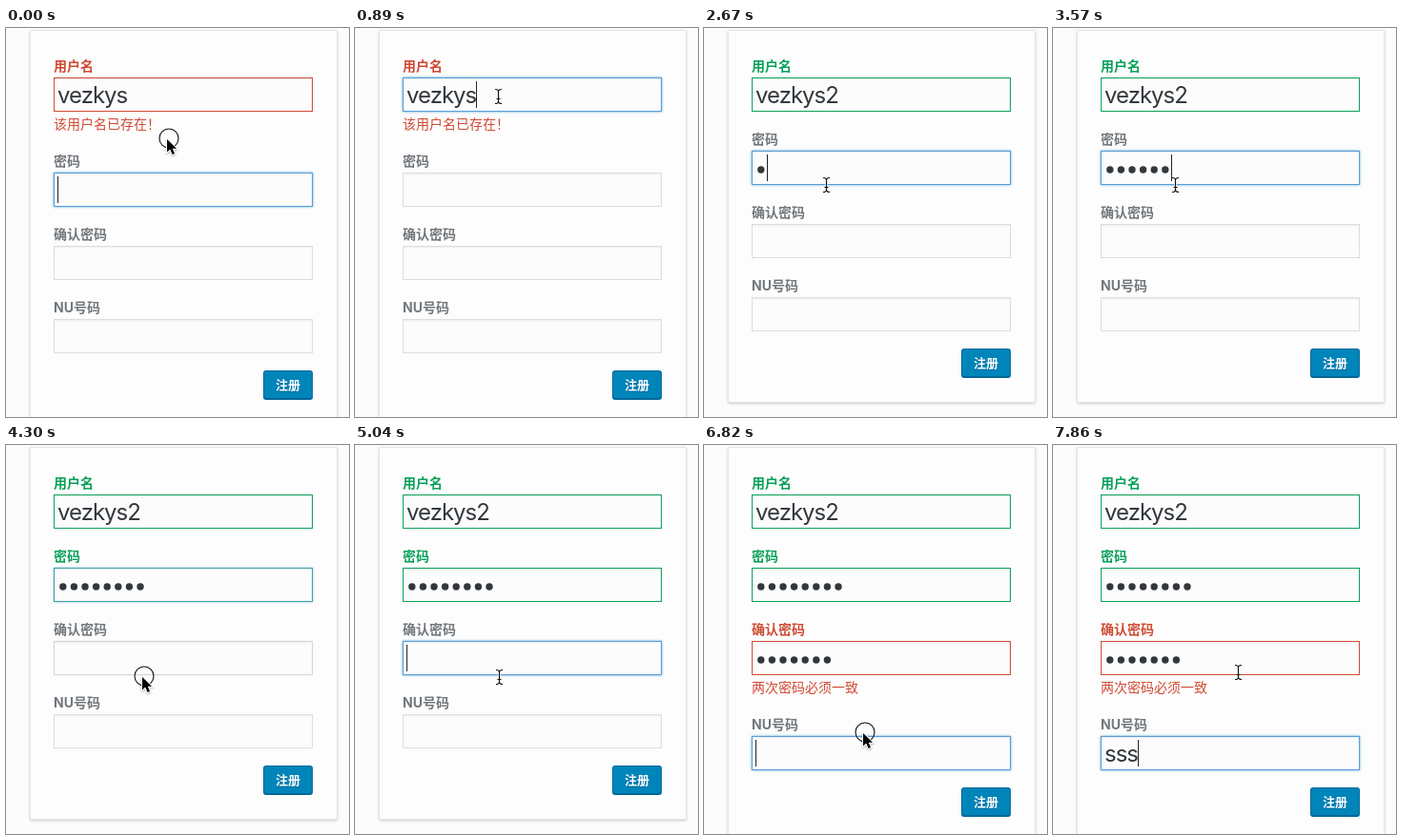
These frames come from a looping animation (360x409 px, 8 s). An HTML page with a canvas:

```html
<!DOCTYPE html>
<html lang="zh-CN">
<head>
<meta charset="utf-8">
<title>注册</title>
<style>
html, body { margin: 0; width: 100%; height: 100%; overflow: hidden; background: #fcfcfc; }
canvas { display: block; width: 360px; height: 409px; }
</style>
</head>
<body>
<canvas id="stage"></canvas>
<script>
const W = 360, H = 409, LOOP = 8000, STEP = 148.3;
const CJK = '"Noto Sans CJK SC", "Noto Sans CJK", sans-serif';
const RED = '#cf4b34', GREEN = '#0aa15b', BLUE = '#5b9dd9';
const GRAY = '#72777c', LINE = '#dddddd', INK = '#32373c';
const LEFT = 50, WIDTH = 272, HEIGHT = 36, GAP = 23, PITCH = 11.6;

const canvas = document.getElementById('stage');
const ctx = canvas.getContext('2d');
const dpr = window.devicePixelRatio || 1;
canvas.width = W * dpr;
canvas.height = H * dpr;

// Pointer stops: step, x, y
const path = [
  [0, 169, 117], [1, 166, 110], [4, 150, 72], [10, 150, 72], [12, 135, 148],
  [13, 128, 165], [27, 128, 165], [29, 143, 244], [32, 143, 244], [35, 168, 243],
  [42, 168, 243], [44, 167, 303], [47, 167, 303], [50, 194, 239], [54, 194, 239]
];
const clicks = [[0, 0], [4, 5], [13, 14], [29, 31], [44, 46]];

const clamp = (v, lo, hi) => Math.max(lo, Math.min(hi, v));
const within = (n, a, b) => n >= a && n <= b;

function pointerAt(n) {
  const i = path.findIndex(p => p[0] > n);
  const [n0, x0, y0] = path[i - 1], [n1, x1, y1] = path[i];
  const k = (n - n0) / (n1 - n0);
  return [x0 + (x1 - x0) * k, y0 + (y1 - y0) * k];
}

function mix(a, b, k) {
  const part = (c, i) => parseInt(c.slice(i, i + 2), 16);
  return 'rgb(' + [1, 3, 5].map(i => Math.round(part(a, i) + (part(b, i) - part(a, i)) * k)) + ')';
}

function shadow(color, blur, dy = 0) {
  ctx.shadowColor = color;
  ctx.shadowBlur = blur * dpr;
  ctx.shadowOffsetY = dy * dpr;
}

function text(str, x, y, font, color, spacing = 0) {
  ctx.font = font;
  ctx.letterSpacing = spacing + 'px';
  ctx.fillStyle = color;
  ctx.fillText(str, x, y);
  return ctx.measureText(str).width;
}

function box(x, y, w, h, r) {
  ctx.beginPath();
  ctx.roundRect(x, y, w, h, r);
}

function drawCard(bottom) {
  ctx.save();
  shadow('rgba(0,0,0,.2)', 3, 1);
  ctx.fillStyle = '#e6e6e6';
  box(25, 2, 323, bottom - 2, 2);
  ctx.fill();
  ctx.restore();
  ctx.fillStyle = '#fdfdfd';
  ctx.fillRect(26, 3, 321, bottom - 4);
}

function drawField(f, y) {
  const focus = f.focus || 0, tone = f.tone || LINE;
  text(f.label, LEFT, y - 7, `bold 14px Inter, ${CJK}`, f.tone || GRAY);

  ctx.save();
  if (focus) shadow(`rgba(30,140,190,${0.8 * focus})`, 2.5);
  ctx.fillStyle = mix(tone, BLUE, focus);
  ctx.fillRect(LEFT, y, WIDTH, HEIGHT);
  ctx.restore();
  ctx.fillStyle = '#fcfcfc';
  ctx.fillRect(LEFT + 1, y + 1, WIDTH - 2, HEIGHT - 2);
  ctx.fillStyle = 'rgba(0,0,0,.045)';
  ctx.fillRect(LEFT + 1, y + 1, WIDTH - 2, 1);
  ctx.fillStyle = 'rgba(0,0,0,.02)';
  ctx.fillRect(LEFT + 1, y + 2, WIDTH - 2, 1);

  let end = 54;
  if (f.value) end += text(f.value, 54, y + 27, '24px Inter, sans-serif', INK, -1);
  if (f.dots) {
    ctx.fillStyle = INK;
    for (let i = 0; i < f.dots; i++) {
      ctx.beginPath();
      ctx.arc(59.8 + i * PITCH, y + 20, 3.7, 0, 7);
      ctx.fill();
    }
    end += f.dots * PITCH;
  }
  if (f.caret) {
    ctx.fillStyle = '#222';
    ctx.fillRect(Math.round(end), y + 4, 1, 28);
  }
  if (f.error) text(f.error, LEFT, y + 54, `14px ${CJK}`, RED);
}

function drawButton(y) {
  ctx.fillStyle = '#006799';
  box(270, y, 52, 31, 3);
  ctx.fill();
  ctx.fillStyle = '#0085ba';
  box(271, y + 1, 50, 28, 2);
  ctx.fill();
  ctx.save();
  shadow('#006799', 1, 1);
  text('注册', 283, y + 20, `bold 13px ${CJK}`, '#fff');
  ctx.restore();
}

function drawArrow(x, y) {
  ctx.save();
  ctx.translate(x, y);
  ctx.beginPath();
  [[0, 0], [0, 13.5], [3.2, 10.6], [5.6, 16], [8, 15], [5.7, 9.7], [10, 9.7]]
    .forEach(p => ctx.lineTo(...p));
  ctx.closePath();
  shadow('rgba(0,0,0,.3)', 2, 1);
  ctx.strokeStyle = '#fff';
  ctx.lineWidth = 2;
  ctx.stroke();
  shadow('transparent', 0);
  ctx.fillStyle = '#000';
  ctx.fill();
  ctx.restore();
}

function drawBeam(x, y) {
  ctx.save();
  ctx.translate(Math.round(x) + 0.5, Math.round(y));
  ctx.beginPath();
  for (const s of [-1, 1]) {
    ctx.moveTo(-3.5, s * 7.5);
    ctx.quadraticCurveTo(0, s * 7.5, 0, s * 5);
    ctx.quadraticCurveTo(0, s * 7.5, 3.5, s * 7.5);
  }
  ctx.moveTo(0, -6);
  ctx.lineTo(0, 6);
  ctx.moveTo(-2, 2.5);
  ctx.lineTo(2, 2.5);
  ctx.strokeStyle = 'rgba(255,255,255,.8)';
  ctx.lineWidth = 3;
  ctx.stroke();
  ctx.strokeStyle = '#111';
  ctx.lineWidth = 1.2;
  ctx.stroke();
  ctx.restore();
}

function drawPointer(n) {
  const [x, y] = pointerAt(n);
  const pressed = clicks.some(c => within(n, ...c));
  if (pressed) {
    ctx.beginPath();
    ctx.arc(x + 2, y - 1, 10, 0, 7);
    ctx.strokeStyle = '#111';
    ctx.lineWidth = 1.1;
    ctx.stroke();
  }
  if (pressed || n < 3 || n === 47) drawArrow(x, y);
  else drawBeam(x, y);
}

function fieldsAt(n) {
  const taken = n < 14, differs = n >= 45;
  const user = {
    label: '用户名', tone: taken ? RED : GREEN,
    value: n < 10 ? 'vezkys' : 'vezkys2',
    error: taken && '该用户名已存在！'
  };
  const pass = {
    label: '密码', tone: n >= 29 && GREEN,
    dots: n < 18 ? 0 : n < 27 ? clamp(n - 18, 1, 7) : 8
  };
  const again = {
    label: '确认密码', tone: differs && RED,
    dots: clamp(n - 35, 0, 7),
    error: differs && '两次密码必须一致'
  };
  const number = { label: 'NU号码', value: 's'.repeat(clamp(n - 50, 0, 3)) };

  const active = n < 4 ? pass : n < 13 ? user : n < 29 ? pass : n < 45 ? again : number;
  active.focus = n === 29 ? 0.1 : within(n, 30, 31) ? 0.7 : 1;
  active.caret = n !== 17 && n !== 29;
  if (n === 29) pass.focus = 0.6;
  return [user, pass, again, number];
}

function draw(n) {
  ctx.setTransform(dpr, 0, 0, dpr, 0, 0);
  ctx.fillStyle = '#fcfcfc';
  ctx.fillRect(0, 0, W, H);

  const fields = fieldsAt(n);
  drawCard(394 + (fields.some(f => f.error) ? GAP : 0));
  let y = 52;
  for (const f of fields) {
    drawField(f, y);
    y += 77 + (f.error ? GAP : 0);
  }
  drawButton(y - 23);
  drawPointer(n);
}

function tick(now) {
  draw(Math.min(53, Math.floor((now % LOOP + 1) / STEP)));
  requestAnimationFrame(tick);
}
requestAnimationFrame(tick);
</script>
</body>
</html>
```
